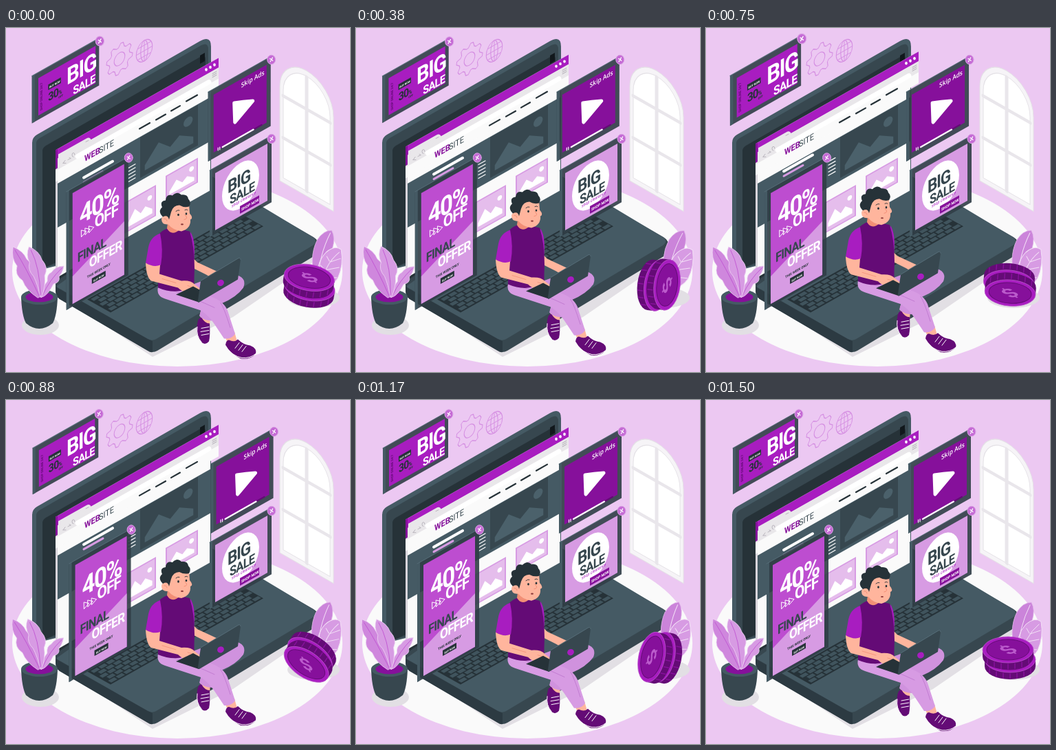
Write an HTML page with a canvas that moves like this. It is 500 px wide and 500 px high and loops after 1540 ms.

```html
<!DOCTYPE html>
<html lang="en">
<head>
<meta charset="utf-8">
<title>Pop-up ads</title>
<style>
html, body { margin: 0; width: 100%; height: 100%; overflow: hidden; background: #ecc8f2; }
canvas { display: block; width: 100vw; height: 100vh; }
</style>
</head>
<body>
<canvas id="stage" width="500" height="500"></canvas>
<script>
const ctx = document.getElementById('stage').getContext('2d');
const SLOPE = 0.565;
const LOOP = 1540, BEATS = 37;
const C = {
  ink: '#263238', dark: '#37474f', slate: '#455a64', main: '#a81dc0', deep: '#86109b',
  plum: '#640b76', mid: '#bd4dd0', lilac: '#d79be3', pale: '#e5bdec', white: '#fff',
  skin: '#ffb59d', skinShade: '#f28f76', grey: '#e2dfe4', glass: 'rgba(48,62,70,.9)'
};

function shape(d, fill, stroke, width = 1) {
  const path = new Path2D(d);
  if (fill) { ctx.fillStyle = fill; ctx.fill(path); }
  if (stroke) {
    ctx.strokeStyle = stroke; ctx.lineWidth = width;
    ctx.lineCap = ctx.lineJoin = 'round';
    ctx.stroke(path);
  }
}
function oval(x, y, rx, ry, fill, stroke, width = 1) {
  ctx.beginPath();
  ctx.ellipse(x, y, rx, ry, 0, 0, 2 * Math.PI);
  if (fill) { ctx.fillStyle = fill; ctx.fill(); }
  if (stroke) { ctx.strokeStyle = stroke; ctx.lineWidth = width; ctx.stroke(); }
}
// Parallelogram on the wall plane that rises to the right.
function face(x, y, w, h, fill) {
  const r = y - SLOPE * w;
  shape(`M${x} ${y}L${x + w} ${r}V${r + h}L${x} ${y + h}Z`, fill);
}
function rule(x, y, w, color, width) {
  shape(`M${x} ${y}L${x + w} ${y - SLOPE * w}`, null, color, width);
}
function within(draw, ...m) {
  ctx.save();
  ctx.transform(...m);
  draw();
  ctx.restore();
}
const iso = (x, y, draw) => within(draw, 0.87, -0.5, 0, 1, x, y);
const shift = (x, y, draw) => within(draw, 1, 0, 0, 1, x, y);
function turn(x, y, deg, draw) {
  const a = deg * Math.PI / 180, c = Math.cos(a), s = Math.sin(a);
  within(() => shift(-x, -y, draw), c, s, -s, c, x, y);
}
function grow(x, y, k, draw) {
  within(() => shift(-x, -y, draw), k, 0, 0, k, x, y);
}
function label(text, x, y, size, fill, style = 'bold', family = 'Roboto') {
  iso(x, y, () => {
    ctx.font = `${style} ${size}px ${family}, sans-serif`;
    ctx.fillStyle = fill;
    ctx.fillText(text, 0, 0);
  });
}
function headline(text, x, y, size, fill) {
  ctx.save();
  ctx.letterSpacing = `${-0.05 * size}px`;
  label(text, x, y, size, fill);
  ctx.restore();
}
function track(keys, p) {
  const i = Math.max(1, keys.findIndex(k => k[0] >= p));
  const [a, u] = keys[i - 1], [b, v] = keys[i];
  return u + (v - u) * (p - a) / (b - a);
}

function windowArch() {
  const arch = (x, top, w, ry, bottom) =>
    `M${x} ${bottom}V${top}A${w / 2} ${ry} 0 0 1 ${x + w} ${top}V${bottom}Z`;
  within(() => {
    shape(arch(0, 0, 78, 45, 137), '#f6f4f7', '#e4e1e6');
    shape(arch(5, 3, 68, 40, 130), C.white, '#e4e1e6');
    shape('M39 -36V130M5 11H73M5 72H73', null, '#e9e6eb', 5);
  }, 1, 0.57, 0, 1, 398, 85);
}

function picture(x, y, w, h, ground, detail) {
  face(x, y, w, h, ground);
  within(() => {
    shape(`M${w * .08} ${h * .88}V${h * .75}L${w * .32} ${h * .38}L${w * .52} ${h * .65}L${w * .68} ${h * .5}L${w * .92} ${h * .72}V${h * .88}Z`, detail);
    oval(w * .83, h * .28, w * .08, w * .08, detail);
  }, 1, -SLOPE, 0, 1, x, y);
}

function pageBody() {
  face(72, 192, 225, 171, '#fafafa');
  shape('M72 192L75 191V362L72 364Z', '#d9d5dc');
  face(75, 226, 222, 64, C.slate);
  picture(195, 159, 84, 59, C.dark, '#4b616b');
  for (const [x, y, w, h] of [[172, 254, 46, 45], [232, 215, 47, 36]]) {
    face(x, y, w, h, C.lilac);
    face(x + 2, y + 1, w - 4, h - 4, C.pale);
    picture(x + 2, y + 1, w - 4, h - 4, C.pale, C.white);
  }
}

function pageHeader() {
  face(72, 178, 237, 46, '#fafafa');
  face(72, 178, 237, 14, C.main);
  face(72, 192, 237, 16, '#e9e7ea');
  shape('M72 178L75 176V204L72 206Z', C.deep);
  shape('M76 190V184L117 161Q122 158 124 164L130 162L78 193Z', '#e9e7ea');
  shape('M116 166l4 -2', null, '#b9b4bc', 1);
  rule(104, 187, 191, C.white, 7);
  shape('M83 197l3 -4M83 197l4 0M90 192l4 -2M92 189l2 1M98 188a2 3 0 1 1 2 -3', null, '#b4afb8', .9);
  [[291, 61], [297, 57.5], [303, 54]].forEach(([x, y]) => oval(x, y, 1.8, 2.2, C.white));
  for (let i = 0; i < 3; i++) rule(300, 67 + i * 2.6, 6, '#aaa4ae', .9);
  label('WEB', 114, 195, 12.5, C.deep);
  label('SITE', 135, 183.5, 12.5, C.dark, 'normal');
  [[194, 147, 15], [218, 134, 14], [240, 121, 13], [262, 107, 16]]
    .forEach(([x, y, w]) => rule(x, y, w, C.ink, 2.2));
  rule(113, 218, 42, C.white, 4);
  rule(113, 225, 28, C.lilac, 3);
  for (let i = 0; i < 5; i++) rule(178, 204 + i * 5, 10, C.white, 1.2);
}

function laptop(lift) {
  shape('M80 390L213 478L330 420L454 335L440 322L213 455Z', C.grey);
  shape('M38 167Q38 159 45 155L282 19Q298 10 298 27V290L48 352Q38 350 38 342Z', C.slate);
  shape('M44 168Q44 163 49 160L284 25Q294 20 294 31V290L52 349Q44 350 44 341Z', C.dark);
  shape('M53 179Q53 174 58 171L284 41Q290 38 290 46V240L53 350Z', C.ink);
  shape('M282 40l7 -4v12l-7 4Z', '#11181c');
  shape('M72 364L294 234V280L85 395Q72 390 72 378Z', C.ink);
  shape('M72 373Q72 368 82 362L300 219L447 304Q456 309 455 322Q455 328 447 332L220 469Q213 473 206 469L78 394Q72 390 72 383Z', C.dark);
  shape('M75 374L300 216L446 304Q454 310 446 316L220 451Q213 456 206 452L80 380Q72 377 75 374Z', C.slate);
  shape('M213 455V471Q210 472 206 469L78 394Q72 390 72 376L206 452Z', '#2c3a42');
  within(() => {
    ctx.fillStyle = C.ink;
    ctx.fillRect(-3, -2, 222, 34);
    ctx.fillStyle = '#40545d';
    for (let row = 0; row < 5; row++)
      for (let x = row % 2 * 4; x < 210; x += 11) ctx.fillRect(x, row * 6.3, 9, 4.8);
  }, 1, -SLOPE, 1, .56, 123, 394);
  pageBody();
  shift(0, lift, pageHeader);
}

function doodles() {
  const line = '#d58fe2';
  iso(165, 45, () => {
    ctx.beginPath();
    for (let i = 0; i < 32; i++) {
      const a = (i + .5) * Math.PI / 16, r = i % 4 < 2 ? 22 : 17;
      ctx.lineTo(r * Math.cos(a), r * Math.sin(a));
    }
    ctx.closePath();
    ctx.strokeStyle = line; ctx.lineWidth = 1.2;
    ctx.stroke();
    oval(0, 0, 9, 9, null, line, 1.2);
  });
  iso(201, 33, () => {
    oval(0, 0, 13.5, 15, null, line, 1.2);
    oval(0, 0, 6, 15, null, line, 1.2);
    shape('M0 -15V15M-13 0H13M-11 -8H11M-11 8H11', null, line, 1.1);
  });
}

function frame(x, y, w, h) {
  face(x, y, w, h, C.glass);
  face(x, y, 4, h, C.slate);
  rule(x, y, w, '#566d78', 1);
}
function closeButton(x, y) {
  oval(x, y, 6, 6.7, '#c56ad5', '#dba4e5', 1);
  shape(`M${x - 2} ${y - 1.4}l4 3M${x + 1.7} ${y - 3}l-3.4 6`, null, C.white, 1.3);
}

function bannerAd() {
  frame(39, 70, 95, 67);
  face(48, 73, 81, 53, C.main);
  headline('BIG', 88, 83, 33, C.white);
  headline('SALE', 97, 97, 16.5, C.white);
  face(62, 82, 18, 8, C.ink);
  label('BUY NOW', 63.5, 87.5, 4, C.white);
  headline('30', 62, 106, 16, C.ink);
  label('%', 76.5, 97, 8, C.ink);
  label('OFF', 76.5, 102, 4.2, C.ink);
  within(() => {
    ctx.font = 'bold 4.5px Roboto, sans-serif';
    ctx.fillStyle = C.plum;
    ctx.fillText('SHOP ONLINE 24/7', 0, 0);
  }, 0, -1, 1, -SLOPE, 54, 118);
  closeButton(135, 20.5);
}

function videoAd() {
  frame(294, 93, 91, 101);
  face(302, 97, 77, 84, C.deep);
  label('Skip Ads', 342, 87, 9.6, C.white, '600', 'Open Sans');
  shape('M332 109Q345 107 359 106L333 137Z', C.white, C.white, 5);
  shape('M308.5 174v4M311 173v4', null, C.white, 1.2);
  rule(315, 173, 57, C.plum, 2.2);
  rule(315, 173, 45, C.white, 2.2);
  closeButton(386, 46);
}

function circleAd() {
  frame(296, 207, 90, 97);
  face(304, 211, 76, 83, C.lilac);
  iso(341, 229, () => oval(0, 0, 31, 33, C.white));
  headline('BIG', 322, 241, 26, C.dark);
  headline('SALE', 325, 257, 19, C.dark);
  label('shop clearance', 328, 261, 6.2, C.main, 'italic');
  face(340, 259, 28, 11, C.deep);
  label('SHOP NOW', 342, 266, 5.7, C.white);
  closeButton(386, 161);
}

function tallAd() {
  frame(88, 238, 90, 172);
  face(97, 240, 75, 161, C.mid);
  shape('M97 361L172 281V358.6L97 401Z', C.lilac);
  headline('40%', 107, 286, 38, C.white);
  headline('OFF', 129, 291, 24, C.white);
  for (let i = 0; i < 3; i++) {
    shape(`M${110 + i * 5.5} ${294 - i * 3}l7 1.5l-7 8Z`, null, C.white, 1);
  }
  headline('FINAL', 104, 341, 19, C.dark);
  headline('OFFER', 121, 349, 20, C.white);
  label('THIS WEEK ONLY', 118, 364, 5, C.ink);
  face(125, 364, 20, 8, C.ink);
  label('BUY NOW', 127.5, 369.2, 4, C.white);
  closeButton(178.5, 188.5);
}

function pottedPlant(sway) {
  oval(50, 432, 27, 14, C.grey);
  shape('M22 391Q23 418 29 429Q48 445 68 429Q74 418 75 391Z', C.dark);
  oval(48.5, 391, 26.5, 11, C.slate);
  oval(48.5, 391, 20, 7.5, C.deep);
  const edge = '#efd6f4';
  turn(48, 390, sway * .4, () => {
    shape('M46 392Q29 381 24 367Q12 359 16 346Q7 335 10 318Q25 324 30 336Q40 343 42 357Q50 371 50 390Z', '#cf87dd', edge, .8);
    shape('M51 391Q53 376 60 368Q59 358 66 355Q72 346 84 346Q82 356 77 361Q79 370 69 372Q62 386 55 390Z', C.lilac, edge, .8);
    shape('M48 389Q31 352 13 323M53 389Q63 366 81 349', null, C.mid, .8);
  });
  turn(48, 390, sway, () => {
    shape('M50 391Q46 373 40 361Q31 352 34 341Q28 330 33 318Q48 324 52 337Q62 348 56 360Q58 374 52 391Z', C.lilac, edge, .8);
    shape('M50 388Q49 348 36 323', null, C.mid, .8);
  });
}

function backLeaves(sway) {
  oval(447, 392, 38, 15, C.grey);
  turn(465, 375, sway, () => {
    shape('M450 372Q439 334 452 308Q461 294 473 294Q479 305 474 321Q470 348 455 372Z', '#cb84da', C.pale, .8);
    shape('M453 374Q449 342 465 326Q478 315 487 322Q491 344 482 364Q474 376 461 379Z', C.lilac, '#f3e0f6', 1);
    shape('M453 368Q455 330 471 298M459 375Q462 344 484 326M463 351l-6 -6M463 352l21 -4M470 339l-4 -7M471 340l15 -5M460 362l21 1', null, '#f3e0f6', 1);
  });
}

function coin(x, y) {
  shape(`M${x - 37} ${y}V${y + 10}A37 19 0 0 0 ${x + 37} ${y + 10}V${y}Z`, C.plum);
  for (let i = -3; i <= 3; i++) {
    const dx = i * 10, dy = 19 * Math.sqrt(1 - (dx / 37) ** 2);
    shape(`M${x + dx} ${y + dy + 2}v7`, null, C.deep, 1.5);
  }
  oval(x, y, 37, 19, C.main, '#bb55cc', .8);
  oval(x, y, 31, 15, C.deep, C.plum, 1);
}
function coins(angle) {
  turn(441, 374, angle, () => {
    coin(442, 377);
    coin(439, 363);
    within(() => {
      ctx.font = 'bold 31px Roboto, sans-serif';
      ctx.fillStyle = '#bb5bcc';
      ctx.textAlign = 'center';
      ctx.fillText('$', 0, 11);
      ctx.textAlign = 'left';
    }, .8, -.4, .8, .4, 439, 363);
  });
}

function shoes() {
  shape('M282 414L297 418L296 435L284 432Z', C.skin);
  shape('M278 431Q279 421 284 421Q289 430 296 430Q297 447 295 456Q289 463 283 456Q275 445 278 431Z', C.plum);
  shape('M278 435Q276 448 284 457M284 437l11 -2M283 442l12 -2M284 447l11 -2', null, C.white, 1);
  shape('M317 446L332 442L336 456L323 460Z', C.skin);
  shape('M319 461Q320 454 324 454Q332 458 337 453Q345 461 355 462Q365 466 363 474Q355 483 341 481Q326 474 319 461Z', C.plum);
  shape('M320 465Q329 477 343 480Q355 481 363 474M333 466l6 -8M338 469l6 -8M343 471l6 -8', null, C.white, 1);
}

function man() {
  shoes();
  shape('M265 376Q315 355 337 360Q350 365 345 378Q335 392 313 401L299 426Q288 426 281 419L288 393Z', '#d092de');
  shape('M221 377Q218 390 231 394L283 411Q295 419 303 431L317 452Q328 453 333 445L322 411Q316 397 298 391L273 375Z', C.lilac);
  shape('M240 381Q275 394 303 407M312 400Q317 407 326 436', null, '#c27cd2', 1);
  shape('M269 332L278 341L306 354Q312 359 306 363Q296 363 291 359L269 348Z', C.skin);
  shape('M235 284L252 285V301Q242 307 233 299Z', C.skinShade);
  shape('M268 297Q276 309 273 338L264 338Z', C.main);
  shape('M234 292Q241 304 253 293L267 296Q274 318 274 350Q273 373 274 375Q249 390 221 378Q222 347 216 323Q214 300 234 292Z', C.plum);
  shape('M224 299Q210 304 207 319L203 342Q214 350 225 345Q229 323 224 299Z', C.main);
  shape('M203 342Q215 349 224 345L223 358L255 368Q269 367 274 373L283 380Q281 384 273 381L265 386Q256 384 250 378L211 368Q204 363 203 342Z', C.skin);
  shape('M266 379l8 2M264 375l10 3M247 371l-20 -6', null, C.skinShade, .8);
  shape('M247 388L272 376L296 389L280 399Z', C.ink);
  shape('M283 368L338 335Q341 334 341 337L337 366L281 399Q278 400 279 396Z', C.dark);
  shape('M283 368L338 335Q341 334 341 337', null, '#566d78', 1);
  turn(312, 371, -25, () => oval(312, 371, 5, 4.5, C.main));
  shape('M235 260Q250 249 266 257L267 270Q273 277 268 279Q269 292 255 296Q242 294 236 286Q226 287 226 278Q228 271 235 274Z', C.skin);
  shape('M228 275Q220 267 227 261Q223 252 232 251Q233 241 242 244Q249 237 255 243Q264 242 265 249Q270 254 266 260Q259 262 252 258Q243 258 240 268L237 279Q235 271 228 275Z', C.ink);
  shape('M247 267q3 -2.5 5 -1.5M260 265q2.5 -1.5 4 0', null, C.ink, .9);
  oval(250.5, 272, 1.4, 1.8, C.ink);
  oval(262, 270.5, 1.3, 1.7, C.ink);
  oval(256, 286, 2, 1.1, '#8c3a3a');
  shape('M260 272q6 6 -1 7', null, C.skinShade, 1);
  shape('M230 278q3 -1 4 3', null, C.skinShade, 1);
}

const SHAKE = [[0, 0], [.1, -1], [.2, 2], [.3, -4], [.4, 4], [.5, -4], [.6, 4], [.7, -4], [.8, 2], [.9, -1], [1, 0]];
const HEARTBEAT = [[0, 1], [.1, 1.1], [.3, 1], [.4, 1], [.5, 1.1], [.6, 1], [1, 1]];
const WIND = [[0, 0], [.25, 3], [.75, -3], [1, 0]];
const FLOAT = [[0, 0], [.5, -10], [1, 0]];

function draw(time) {
  // Motion advances in equal beats; beat starts round to 10 ms.
  const beat = Math.min(BEATS - 1, Math.floor((time % LOOP + 5) * BEATS / LOOP));
  const p = (beat + 1) / BEATS;
  const shake = track(SHAKE, p), sway = track(WIND, p), lift = track(FLOAT, p);

  ctx.fillStyle = '#ecc8f2';
  ctx.fillRect(0, 0, 500, 500);
  oval(249, 353, 240, 139, '#fafafa');
  windowArch();
  laptop(lift);
  doodles();
  grow(86, 77, track(HEARTBEAT, p), bannerAd);
  shift(shake, 0, videoAd);
  circleAd();
  shift(shake, 0, tallAd);
  pottedPlant(sway);
  backLeaves(sway);
  coins(360 * p);
  shift(0, lift, man);
}

const start = performance.now();
function tick() {
  draw(performance.now() - start);
  requestAnimationFrame(tick);
}
tick();
</script>
</body>
</html>
```
